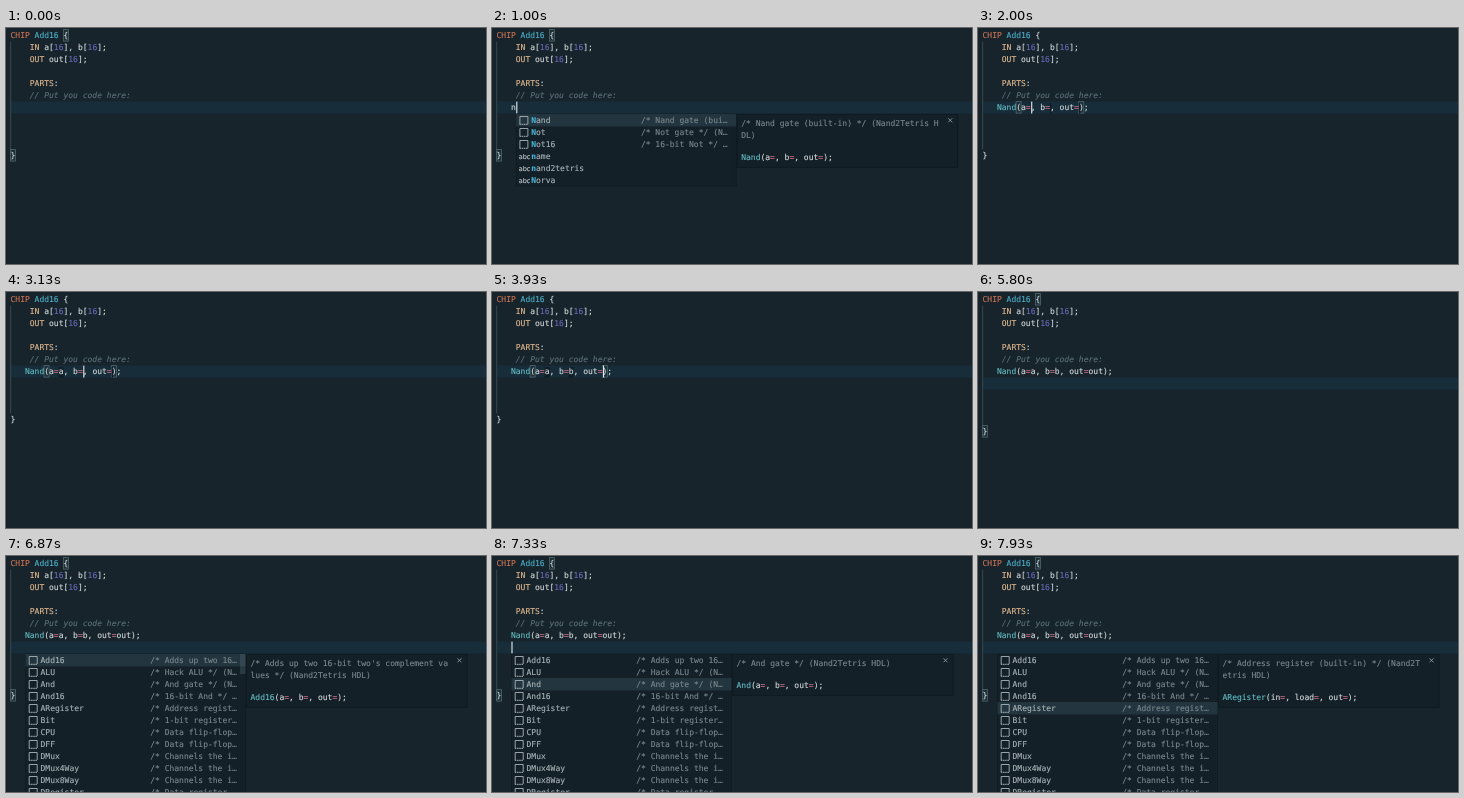
An HTML page that plays this animation: 480x236 px, repeating every 8 s.

```html
<!DOCTYPE html>
<html lang="en">
<head>
<meta charset="utf-8">
<title>Code completion</title>
<style>
html, body { margin: 0; width: 100%; height: 100%; overflow: hidden; background: #17242b; }
svg { display: block; width: 100%; height: 100%; }
text { font: 8px "DejaVu Sans Mono", monospace; white-space: pre; color: #d5dcde; text-rendering: geometricPrecision; }
text, tspan { fill: currentColor; stroke: currentColor; stroke-width: .12; }
.chip { color: #cb7355; }
.name { color: #4bb0ca; }
.call { color: #62bcc4; }
.key { color: #e2ba90; }
.num { color: #6867b4; }
.note { color: #5d7079; font-style: italic; }
.eq { color: #d8708a; }
.dim { color: #7a878d; }
.item { color: #a9b4b8; }
.hit { color: #45b3d3; font-weight: bold; }
.abc { font: 6.5px "DejaVu Sans", sans-serif; color: #c3cacd; }
</style>
</head>
<body>
<svg id="stage" viewBox="0 0 480 236"></svg>
<script>
const stage = document.getElementById("stage");
const LOOP = 8000, CHAR = 4.816, LEFT = 4.5, LINE = 12;
const colX = col => LEFT + col * CHAR;
const rowY = row => 1.6 + row * LINE;

const rect = (x, y, w, h, fill, more = "") =>
  `<rect x="${x}" y="${y}" width="${w}" height="${h}" fill="${fill}" ${more}/>`;
const path = (d, color, more = "") => `<path d="${d}" fill="none" stroke="${color}" ${more}/>`;
const text = (x, y, body, cls = "") => `<text x="${x}" y="${y}" class="${cls}">${body}</text>`;
const span = (cls, body) => `<tspan class="${cls}">${body}</tspan>`;
const line = (row, col, body, cls) => text(colX(col), 10.3 + row * LINE, body, cls);
const bracket = (row, col) =>
  rect(colX(col) - .1, rowY(row), 5, 11.5, "#1c3039", 'stroke="#52666c" stroke-width=".8"');
const call = sig => sig.replace(/=/g, span("eq", "=")).replace(/^\w+/, m => span("call", m));

// Latest entry whose time has come
const at = (table, t) => table.filter(e => e[0] <= t).pop();

// time, row, column; every move restarts the blink
const cursorMoves = [
  [-870, 6, 3], [1000, 6, 4], [1200, 6, 5], [2000, 6, 10], [2870, 6, 11],
  [3130, 6, 15], [3670, 6, 16], [3930, 6, 22], [4530, 6, 23], [4600, 6, 24],
  [4730, 6, 25], [5000, 6, 27], [5330, 7, 3]
];
const selections = [[6000, 0], [6670, 1], [6800, 0], [7000, 1], [7330, 2], [7600, 3], [7870, 4]];
const details = [[6130, 0], [6730, 1], [6870, 0], [7070, 1], [7330, 2], [7600, 3], [7930, 4]];

// label, description, arguments
const nand = ["Nand", "/* Nand gate (built-in) */", "a=, b=, out="];
const words = [["name"], ["nand2tetris"], ["Norva"]];
const listN = [nand, ["Not", "/* Not gate */"], ["Not16", "/* 16-bit Not */"], ...words];
const listNa = [nand, ...words];
const chips = [
  ["Add16", "/* Adds up two 16-bit two's complement values */", "a=, b=, out="],
  ["ALU", "/* Hack ALU */", "x=, y=, zx=, nx=, zy=, ny=, f=, no=, out=, zr=, ng="],
  ["And", "/* And gate */", "a=, b=, out="],
  ["And16", "/* 16-bit And */", "a=, b=, out="],
  ["ARegister", "/* Address register (built-in) */", "in=, load=, out="],
  ["Bit", "/* 1-bit register */"],
  ["CPU", "/* Data flip-flop */"],
  ["DFF", "/* Data flip-flop */"],
  ["DMux", "/* Channels the input */"],
  ["DMux4Way", "/* Channels the input */"],
  ["DMux8Way", "/* Channels the input */"],
  ["DRegister", "/* Data register */"]
];
const fullNote = item => item[1] + " (Nand2Tetris HDL)";

function markHits(label, typed) {
  let i = 0;
  return [...label].map(c =>
    i < typed.length && c.toLowerCase() === typed[i] ? (i++, span("hit", c)) : c).join("");
}

function list(x, y, items, selected, typed) {
  let out = rect(x, y, 220, items.length * LINE, "#142028", 'stroke="#0f1a20" stroke-width=".7"');
  items.forEach((item, i) => {
    const top = y + i * LINE, base = top + 9.2;
    if (i === selected) out += rect(x, top, 220, LINE + .4, "#23363f");
    out += text(x + 15, base, markHits(item[0], typed), "item");
    if (item[1]) {
      const l = x + 3.7, r = x + 11.7;
      out += path(`M${l} ${top + 10}V${top + 2.5}H${r}V${top + 10}`, "#a9b3b7", 'stroke-width=".9"');
      out += path(`M${l - .4} ${top + 10.3}H${r + .4}`, "#a9b3b7", 'stroke-dasharray="1.6 .6"');
      out += text(x + 124.7, base, fullNote(item).slice(0, 17) + "…", "dim");
    } else out += text(x + 2.5, base - .4, "abc", "abc");
  });
  return out;
}

function pane(x, y, item) {
  const rows = fullNote(item).match(/.{1,41}/g);
  const sigY = y + 22.2 + rows.length * LINE;
  const left = x + 221, cx = x + 434, cy = y + 6.3;
  let out = rect(left, y + .3, 220.5, sigY - y + 6.8, "#142028", 'stroke="#0d181e" stroke-width=".8"');
  rows.forEach((r, i) => out += text(x + 225, y + 12 + i * LINE, r, "dim"));
  // Long signatures run off the right edge
  const sig = `${item[0]}(${item[2]});`.slice(0, 44);
  out += text(x + 225, sigY, call(sig));
  return out + path(`M${cx - 2} ${cy - 2}l4 4m0 -4l-4 4`, "#b0babe", 'stroke-width=".7"');
}

function popup(t) {
  if (t >= 1000 && t < 2000) {
    const [x, items, typed] = t < 1270 ? [24.2, listN, "n"] : [29, listNa, "na"];
    return list(x, 86, items, 0, typed) + pane(x, 86, nand);
  }
  if (t < 6000) return "";
  const x = 19.5, shown = at(details, t);
  let out = list(x, 98, chips, at(selections, t)[1], "");
  const scrollbar = t < 6330 || (t >= 6670 && t < 7330);
  if (scrollbar) out += rect(x + 214.5, 98, 5.5, 20, "#4a626b", 'opacity=".4"');
  return out + (shown ? pane(x, 98, chips[shown[1]]) : "");
}

function statement(t) {
  if (t < 1000) return "";
  if (t < 2000) return line(6, 3, t < 1200 ? "n" : "na");
  const a = t < 2870 ? "" : "a", b = t < 3670 ? "" : "b";
  const o = "out".slice(0, [4530, 4600, 4730].filter(k => k <= t).length);
  const head = `Nand(a=${a}, b=`, mid = head + b + ", out=";
  let out = "";
  if (t < 5000) {
    out += bracket(6, 7) + bracket(6, 3 + (mid + o).length);
    for (const [col, s] of [[10, a], [3 + head.length, b], [3 + mid.length, o]])
      out += rect(colX(col), 75, Math.max(1.5, s.length * CHAR), 10.5, "#101d25");
  }
  return out + line(6, 3, call(mid + o + ");"));
}

function scene(t) {
  const [since, row, col] = at(cursorMoves, t);
  const end = t < 5330 ? 10 : 11;
  const size = "[" + span("num", "16") + "]";
  let out = rect(5, rowY(row), 475, LINE, "#172d39");
  out += path(`M4.7 13.5V${rowY(end)}`, "#40545a", 'stroke-width=".8"');
  if (t < 2000 || t >= 5000) out += bracket(0, 11) + bracket(end, 0);
  out += line(0, 0, span("chip", "CHIP") + " " + span("name", "Add16") + " {");
  out += line(1, 4, span("key", "IN") + ` a${size}, b${size};`);
  out += line(2, 4, span("key", "OUT") + ` out${size};`);
  out += line(4, 4, span("key", "PARTS") + ":");
  out += line(5, 4, "// Put you code here:", "note");
  out += statement(t) + line(end, 0, "}");
  if ((t - since) % 1000 < 470) out += rect(colX(col) + .5, rowY(row), 1.1, LINE, "#e6ecee");
  return out + popup(t);
}

let last = "";
function tick(now) {
  const next = scene(now % LOOP);
  if (next !== last) stage.innerHTML = last = next;
  requestAnimationFrame(tick);
}
tick(0);
</script>
</body>
</html>
```
